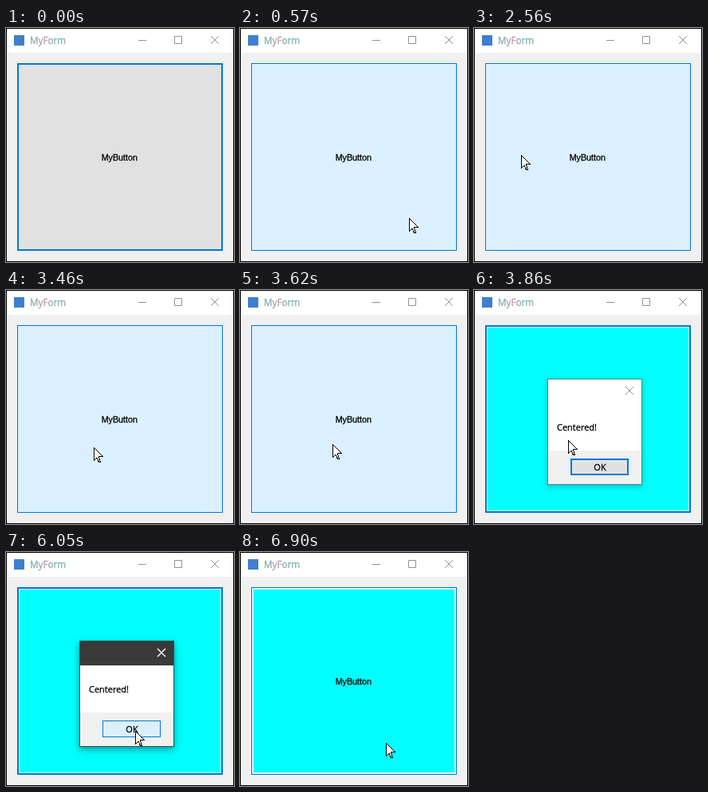
Animation of 286 by 293 pixels, one loop 6940 ms. Source, as an HTML page:

```html
<!DOCTYPE html>
<html lang="en">
<head>
<meta charset="utf-8">
<title>MyForm</title>
<style>
  html, body { margin: 0; width: 100%; height: 100%; overflow: hidden; background: #f0f0f0; }
  svg { display: block; width: 286px; height: 293px; }
  text { font: 11px "Open Sans", sans-serif; stroke: #000; stroke-width: .3px; }
  .caption { font-size: 11.7px; fill: url(#tint); stroke: url(#tint); }
  .label { font: 10.7px "Liberation Sans", Arial, sans-serif; text-anchor: middle; }
  .glyph { fill: none; stroke: #929292; }
  .normal { fill: #e1e1e1; stroke: #0078d7; stroke-width: 2px; }
  .hot { fill: #daf0fe; stroke: #0078d7; }
  .shadow { fill: #fff; filter: drop-shadow(0 2px 3px rgba(0, 0, 0, .28)); }
  .deep { filter: drop-shadow(0 4px 6px rgba(0, 0, 0, .2)); }

  .hover, .back, .dialog, .active, .ok-hover { animation: 6.94s linear infinite; }
  .hover { animation-name: hover; }
  .back { animation-name: back; }
  .dialog { animation-name: dialog; }
  .active { animation-name: active; }
  .ok-hover { animation-name: ok-hover; }

  @keyframes hover {
    0%, 4.7%, 53.71%, 87.7% { opacity: 0; }
    7.9%, 53.7%, 90.5%, 100% { opacity: 1; }
  }
  @keyframes back {
    0%, 53.2% { opacity: 0; }
    53.21%, 100% { opacity: 1; }
  }
  @keyframes dialog {
    0%, 54%, 91%, 100% { opacity: 0; }
    55.5%, 87.8% { opacity: 1; }
  }
  @keyframes active {
    0%, 87.14% { opacity: 0; }
    87.15%, 100% { opacity: 1; }
  }
  @keyframes ok-hover {
    0%, 63.8% { opacity: 0; }
    66.5%, 100% { opacity: 1; }
  }
</style>
</head>
<body>
<svg viewBox="0 0 286 293">
  <defs>
    <linearGradient id="tint" gradientUnits="userSpaceOnUse" x1="30" x2="48" spreadMethod="reflect">
      <stop offset="0" stop-color="#6fb4b6"/>
      <stop offset="1" stop-color="#b99aa4"/>
    </linearGradient>
    <path id="cross" d="M0 0l10 10M10 0l-10 10"/>
  </defs>

  <rect width="286" height="293" fill="#f0f0f0"/>
  <rect width="286" height="31" fill="#fff"/>
  <rect x="10" y="9" width="13" height="13" fill="#3f7fd0"/>
  <text class="caption" x="30" y="20">MyForm</text>
  <path class="glyph" d="M166 15.5h10M211.5 10.5h9v9h-9z"/>
  <use class="glyph" href="#cross" x="257" y="10"/>

  <rect class="normal" x="15" y="45" width="256" height="233"/>
  <rect class="hot hover" x="14.5" y="44.5" width="257" height="234"/>
  <rect class="back" x="17" y="47" width="252" height="229" fill="#0ff"/>
  <text class="label" x="142.3" y="166">MyButton</text>

  <g class="dialog">
    <rect class="shadow" x="92" y="111" width="119" height="133"/>
    <rect class="shadow deep active" x="92" y="111" width="119" height="133"/>
    <rect x="93" y="201" width="117" height="42" fill="#f0f0f0"/>
    <rect x="92.5" y="111.5" width="118" height="132" fill="none" stroke="#3f8f96"/>
    <use class="glyph" href="#cross" x="190" y="121"/>
    <g class="active">
      <rect x="93" y="112" width="117" height="30" fill="#3a3a3a"/>
      <rect x="92.5" y="111.5" width="118" height="132" fill="none" stroke="#4a4a4a"/>
      <use href="#cross" x="190" y="121" stroke="#fff" stroke-width="1.4"/>
    </g>
    <text x="104" y="176">Centered!</text>
    <rect class="normal" x="122" y="212" width="71" height="19"/>
    <rect class="hot ok-hover" x="121.5" y="211.5" width="72" height="20"/>
    <text x="158" y="226" text-anchor="middle">OK</text>
  </g>

  <path id="cursor" fill="#fff" stroke="#000" stroke-linejoin="round" shape-rendering="crispEdges"
        transform="translate(203 300)" d="M.5 .5v16l3.5-3.5 2.5 5.5h2l-2.5-7h5.5z"/>
  <rect x=".5" y=".5" width="285" height="292" fill="none" stroke="#000"/>
</svg>
<script>
  const LOOP = 6940, START = 250, STEP = 47.4;

  // Key points of the pointer path: time, x, y. Equal neighbours are rests.
  const path = [
    [START, 203, 283], [910, 219, 170], [1435, 194, 105], [1900, 145, 86],
    [2328, 61, 129], [2573, 59, 159], [3473, 110, 197], [3750, 118, 188],
    [4220, 118, 188], [4640, 138, 232], [4880, 154, 224], [5480, 162, 224],
    [6550, 162, 224], [6880, 183, 239]
  ];

  // The pointer moves in even ticks.
  const snap = t => START + STEP * Math.floor((t - START + 15) / STEP);

  // Tangent at a key; zero at the ends and next to a rest.
  function slope(i, axis) {
    const a = path[i - 1], b = path[i], c = path[i + 1];
    if (!a || !c || a[axis] === b[axis] || b[axis] === c[axis]) return 0;
    return (c[axis] - a[axis]) / (c[0] - a[0]);
  }

  // Hermite curve through the keys.
  function at(t, axis) {
    const i = path.findLastIndex(key => key[0] <= t);
    const a = path[i], b = path[i + 1];
    if (!b) return a[axis];
    const span = b[0] - a[0], u = (t - a[0]) / span;
    const ease = u * u * (3 - 2 * u);
    return a[axis] + (b[axis] - a[axis]) * ease
      + span * u * (1 - u) * ((1 - u) * slope(i, axis) - u * slope(i + 1, axis));
  }

  const cursor = document.getElementById("cursor");
  let origin;

  function draw(now) {
    origin ??= now;
    const t = snap((now - origin) % LOOP);
    const shown = t >= START;
    cursor.style.visibility = shown ? "visible" : "hidden";
    if (shown) {
      const [x, y] = [1, 2].map(axis => Math.round(at(t, axis)));
      cursor.setAttribute("transform", `translate(${x} ${y})`);
    }
    requestAnimationFrame(draw);
  }
  requestAnimationFrame(draw);
</script>
</body>
</html>
```
